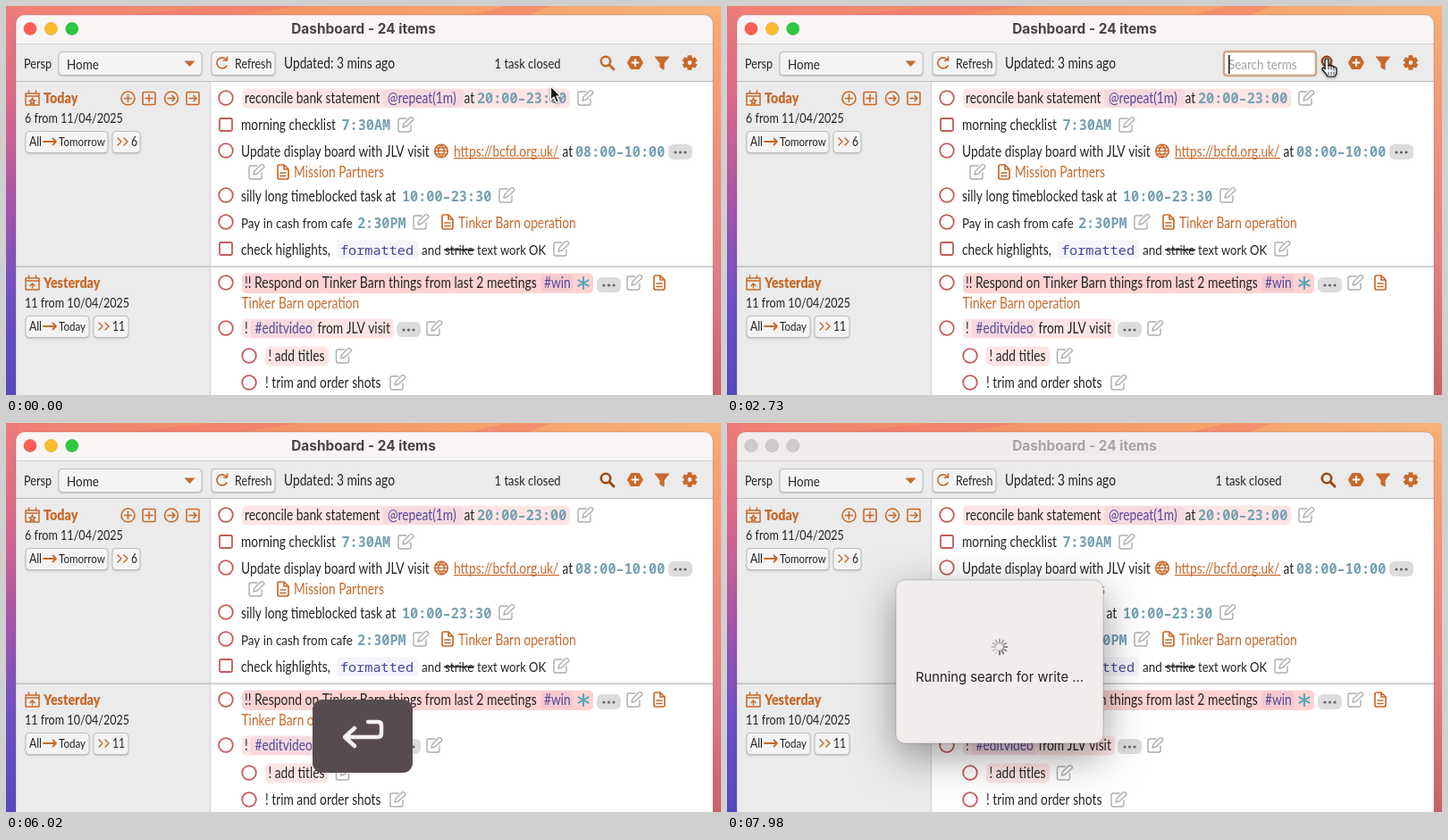
Animation of 800 by 436 pixels, one loop 8 s. Source, as an HTML page with a canvas:

```html
<!DOCTYPE html>
<html lang="en">
<head>
<meta charset="utf-8">
<title>Dashboard search</title>
<style>
  html, body { margin: 0; width: 100%; height: 100%; overflow: hidden; }
  canvas { display: block; width: 800px; height: 436px; }
</style>
</head>
<body>
<canvas id="stage" width="800" height="436"></canvas>
<script>
const ctx = document.getElementById('stage').getContext('2d');
const LOOP = 8000, STEP = 70, TAU = Math.PI * 2;
const INK = '#242424', ORANGE = '#c8692b', RUST = '#9c480f', RED = '#c45b5a',
      GREY = '#adadad', INDIGO = '#53489a', TEAL = '#76a0b1';
const CONDENSED = 0.84;   // one width for the whole condensed face
const GROUP = 'Tinker Barn', CLIENT = 'JLV';

const clamp = v => Math.max(0, Math.min(1, v));
const ease = v => v * v * (3 - 2 * v);
const ramp = (t, from, to) => ease(clamp((t - from) / (to - from)));
const mix = (a, b, k) => a + (b - a) * k;

function text(s, x, y, color = INK, size = 16.4, weight = 400) {
  ctx.save();
  ctx.translate(x, y);
  ctx.scale(CONDENSED, 1);
  ctx.font = `${weight} ${size}px Lato, sans-serif`;
  ctx.fillStyle = color;
  ctx.fillText(s, 0, 0);
  ctx.restore();
}
function mono(s, x, y, color = TEAL, weight = 600) {
  ctx.font = `${weight} 15.2px "Noto Sans Mono", monospace`;
  ctx.fillStyle = color;
  ctx.fillText(s, x, y);
}
function centered(s, x, y, font, color) {
  ctx.font = font;
  ctx.fillStyle = color;
  ctx.textAlign = 'center';
  ctx.fillText(s, x, y);
  ctx.textAlign = 'left';
}
function rect(x, y, w, h, color) {
  ctx.fillStyle = color;
  ctx.fillRect(x, y, w, h);
}
function round(x, y, w, h, r, fill, stroke, line = 1) {
  ctx.beginPath();
  ctx.roundRect(x, y, w, h, r);
  if (fill) { ctx.fillStyle = fill; ctx.fill(); }
  if (stroke) { ctx.strokeStyle = stroke; ctx.lineWidth = line; ctx.stroke(); }
}
function disc(x, y, r, fill, stroke, line = 1) {
  ctx.beginPath();
  ctx.arc(x, y, r, 0, TAU);
  if (fill) { ctx.fillStyle = fill; ctx.fill(); }
  if (stroke) { ctx.strokeStyle = stroke; ctx.lineWidth = line; ctx.stroke(); }
}
// SVG path relative to (x, y)
function path(d, x, y, { stroke, fill, line = 1.6 }) {
  const p = new Path2D(d);
  ctx.save();
  ctx.translate(x, y);
  ctx.lineCap = ctx.lineJoin = 'round';
  if (fill) { ctx.fillStyle = fill; ctx.fill(p); }
  if (stroke) { ctx.strokeStyle = stroke; ctx.lineWidth = line; ctx.stroke(p); }
  ctx.restore();
}
function withShadow(color, blur, dy, draw) {
  ctx.save();
  ctx.shadowColor = color;
  ctx.shadowBlur = blur;
  ctx.shadowOffsetY = dy;
  draw();
  ctx.restore();
}
function gradient(x0, y0, x1, y1, ...colors) {
  const g = ctx.createLinearGradient(x0, y0, x1, y1);
  colors.forEach((c, i) => g.addColorStop(i / (colors.length - 1), c));
  return g;
}

const pencil = (x, y) => path('M1-7H-6Q-8-7-8-5V6Q-8 8-6 8H4Q6 8 6 6V1M-3 3L-2-1L5-8Q6.5-9 8-7.5T8.5-5L1 2Z',
  x, y, { stroke: GREY, line: 1.4 });
const doc = (x, y) => path('M-6-6Q-6-8-4-8H1L6-3V6Q6 8 4 8H-4Q-6 8-6 6ZM1-8V-3H6M-3 1H3M-3 4.5H3',
  x, y, { stroke: ORANGE, line: 1.7 });
const openTask = (x, y) => disc(x, y, 7.8, null, RED, 1.8);
const checkbox = (x, y) => round(x - 7, y - 7, 14, 14, 1.5, null, RED, 1.8);
const chevrons = (x, y) => path('M0-4L4 0L0 4M7-4L11 0L7 4', x, y, { stroke: ORANGE, line: 1.5 });

function morePill(x, y) {
  round(x, y - 8, 27, 17, 6, '#dcdcdc');
  for (let i = -1; i < 2; i++) disc(x + 13.5 + i * 5.5, y + 1, 1.6, '#666');
}
function button(x, y, w, h) {
  withShadow('rgba(0,0,0,.25)', 2, 1, () => round(x, y, w, h, 4, '#f4f4f4'));
  round(x, y, w, h, 4, null, '#bcbcbc');
}

function drawDesktop() {
  rect(0, 0, 800, 436, gradient(0, 0, 800, 0, '#f07d74', '#f28b6c', '#f59b66', '#f6a66c', '#f9b277'));
  path('M230 0H330L250 12H120ZM560 0H610L580 12H510Z', 0, 0, { fill: 'rgba(240,110,110,.4)' });
  rect(0, 0, 14, 436, gradient(0, 0, 0, 436, '#ee7b78', '#da688c', '#a755a8', '#6d51c4', '#5549bd'));
  rect(786, 10, 14, 426, gradient(0, 10, 0, 436, '#f7ad72', '#f0927a', '#e27f80', '#cb6067'));
}

function drawTitleBar(active) {
  rect(11, 10, 780, 33, active ? '#f9f5f4' : '#f0ecec');
  const lights = active ? ['#ff5d56', '#fdbc2e', '#2bc840'] : Array(3).fill('#cfcbcc');
  lights.forEach((c, i) => disc(27 + i * 23.4, 25.5, 7.2, c, 'rgba(0,0,0,.13)', .8));
  centered('Dashboard - 24 items', 400, 31, 'bold 15.4px Inter, sans-serif', active ? '#464345' : '#a5a2a3');
}

function drawToolbar(searchOpen, iconColor) {
  rect(11, 42, 780, 43, '#ebebeb');
  rect(11, 42, 780, 1, '#cfcfcf');
  text('Persp', 20, 70, INK, 15);
  button(59, 51.5, 160, 26);
  text('Home', 68, 70.5, INK, 16);
  path('M-6-3H6L0 3.5Z', 205.5, 64.5, { fill: ORANGE });
  button(230, 51.5, 71, 26);
  path('M5 3A6 6 0 1 1 4.5-4M5.5-7V-3H1.5', 242, 64, { stroke: ORANGE, line: 1.7 });
  text('Refresh', 256, 69.5, INK, 14.8);
  text('Updated: 3 mins ago', 311, 69.5);
  if (!searchOpen) text('1 task closed', 546.5, 69.5, INK, 15.5);

  disc(671, 62, 5.2, null, iconColor, 2.6);
  path('M4 4L9 9', 671, 62, { stroke: iconColor, line: 3 });
  path('M-8.5 0L-4.5-7H4.5L8.5 0L4.5 7H-4.5Z', 704, 63.5, { fill: ORANGE, stroke: ORANGE, line: 1 });
  path('M-3.5 0H3.5M0-3.5V3.5', 704, 63.5, { stroke: '#fff', line: 2 });
  path('M-7.5-6.5H7.5L2 .5V7.5L-2 5V.5Z', 734, 63.5, { fill: ORANGE, stroke: ORANGE, line: 1.2 });
  drawGear(765, 63.5);
}
function drawGear(x, y) {
  ctx.save();
  ctx.translate(x, y);
  for (let i = 0; i < 6; i++) {
    ctx.rotate(TAU / 6);
    rect(-2.4, -8.3, 4.8, 5, ORANGE);
  }
  ctx.restore();
  disc(x, y, 4.4, null, ORANGE, 4);
}

function calendar(x, y, mark) {
  path('M-7.5-5H7.5V8H-7.5ZM-7.5-2H7.5M-4-8V-5M4-8V-5', x, y, { stroke: ORANGE, line: 1.5 });
  path(mark, x, y + 3, { stroke: ORANGE, line: 1.4 });
}
function sectionHead(y, title, mark, summary, target, targetEnd, count) {
  calendar(29.5, y, mark);
  text(title, 42, y + 6, ORANGE, 17, 900);
  text(summary, 21, y + 28, INK, 15);
  button(22, y + 37.5, targetEnd - 22, 24);
  text('All', 26, y + 54, INK, 14.5);
  path('M0 0H14M10.5-3.5L14 0L10.5 3.5', 42, y + 49, { stroke: ORANGE, line: 1.8 });
  text(target, 59, y + 54, INK, 13.8);
  const x = targetEnd + 5;
  button(x, y + 37.5, count.length > 1 ? 39 : 31, 24);
  chevrons(x + 6, y + 49);
  text(count, x + 21, y + 54, INK, 14.5);
}

function drawSidebar() {
  rect(11, 85, 218, 351, '#ebebeb');
  sectionHead(103, 'Today', 'M0-3L1 0H3.5L1.5 1.5L2 4L0 2.5L-2 4L-1.5 1.5L-3.5 0H-1Z',
    '6 from 11/04/2025', 'Tomorrow', 114, '6');
  sectionHead(310, 'Yesterday', 'M0 3V-2M-2.5 .5L0-2L2.5 .5', '11 from 10/04/2025', 'Today', 93, '11');
  const plus = 'M-4 0H4M0-4V4', arrow = 'M-4 0H4M1-3L4 0L1 3';
  [[136.5, plus], [160, plus], [185, arrow], [209, arrow]].forEach(([x, mark], i) => {
    if (i % 2) round(x - 7, 96.5, 14, 14, 1.5, null, ORANGE, 1.6);
    else disc(x, 103.5, 7.5, null, ORANGE, 1.6);
    path(mark, x, 103.5, { stroke: ORANGE, line: 1.6 });
  });
}

function drawToday() {
  openTask(246, 103);
  round(264, 92.5, 367, 22, 5, '#fee5e5');
  round(422, 93.5, 90, 20, 4, '#f5d9de');
  text('reconcile bank statement', 267, 109);
  text('@repeat(1m)', 427, 109, INDIGO);
  text('at', 512.5, 109);
  mono('20:00–23:00', 527, 109);
  pencil(648, 103);

  checkbox(246, 133);
  text('morning checklist', 263, 139);
  mono('7:30AM', 375.5, 139);
  pencil(447, 133);

  openTask(246, 162);
  text(`Update display board with ${CLIENT} visit`, 263, 168.5);
  disc(487, 162.5, 7.3, null, ORANGE, 1.6);
  path('M-7 0H7M-6-3.5H6M-6 3.5H6M0-7Q-7 0 0 7Q7 0 0-7', 487, 162.5, { stroke: ORANGE, line: 1.3 });
  text('https://bcfd.org.uk/', 501, 168.5, ORANGE);
  rect(501, 170, 118, 1.2, ORANGE);
  text('at', 622.5, 168.5);
  mono('08:00–10:00', 637, 168.5);
  morePill(741, 163);
  pencil(280, 186);
  doc(310, 186);
  text('Mission Partners', 322, 192, ORANGE);

  openTask(246, 212);
  text('silly long timeblocked task at', 263, 218.5);
  mono('10:00–23:30', 443, 218.5);
  pencil(560, 212);

  openTask(246, 242);
  text('Pay in cash from cafe', 263, 248.5, INK, 16);
  mono('2:30PM', 393, 248.5);
  pencil(464, 242);
  doc(494, 242);
  text(`${GROUP} operation`, 506, 248.5, ORANGE);

  checkbox(246, 272);
  text('check highlights,', 263, 278.5);
  round(370, 262.5, 91, 21, 4, '#f4f4fa');
  mono('formatted', 374, 278.5, '#3f4997', 500);
  text('and', 465, 278.5, INK, 16);
  text('strike', 491, 278.5, INK, 16);
  rect(490, 272.5, 34, 1.5, INK);
  text('text work OK', 527, 278.5, INK, 15.5);
  pencil(621, 272);
}

function drawYesterday() {
  openTask(246, 310);
  round(264, 299.5, 393, 22.5, 5, '#fdd3d3');
  round(599, 300.5, 35, 20, 4, '#f3c9d0');
  text(`!! Respond on ${GROUP} things from last 2 meetings`, 267, 316, INK, 16.6);
  text('#win', 602, 316, INDIGO);
  path('M0-6.5V6.5M-5.6-3.2L5.6 3.2M-5.6 3.2L5.6-3.2', 646, 310.5, { stroke: '#5aa5b5', line: 2 });
  morePill(661, 312);
  pencil(703, 310);
  doc(731, 310);
  text(`${GROUP} operation`, 263.5, 339, ORANGE);

  openTask(246, 361);
  round(264, 350.5, 170, 22, 5, '#fee5e5');
  round(274, 351.5, 71, 20, 4, '#f5d9de');
  text('!', 267, 367);
  text('#editvideo', 278.5, 367, INDIGO);
  text(`from ${CLIENT} visit`, 348.5, 367);
  morePill(437, 362);
  pencil(479, 361);

  openTask(272, 392);
  round(290, 381.5, 71, 22, 5, '#fee5e5');
  text('! add titles', 293.5, 398);
  pencil(377.5, 392);

  openTask(272, 422);
  text('! trim and order shots', 290, 428);
  pencil(438, 422);
}

function drawSearchField(t, openness) {
  if (openness <= 0) return;
  const right = 659, w = 115 * openness, x = right - w;
  round(x, 51, w, 27, 3, '#fff', '#dfc2b2', 3);
  round(x, 51, w, 27, 3, null, '#b98a70', 1);
  ctx.save();
  ctx.beginPath();
  ctx.rect(x, 51, w, 27);
  ctx.clip();
  const typed = 'write'.slice(0, [4410, 4760, 4970, 5110, 5250].filter(at => t >= at).length);
  if (typed) {
    text(typed, x + 5, 71, '#111', 15.5);
    disc(641.5, 66, 6, '#6d6d6d');
    path('M-2-2L2 2M-2 2L2-2', 641.5, 66, { stroke: '#fff', line: 1.5 });
  } else {
    text('Search terms', x + 5, 71, '#a3a3a3', 16);
  }
  ctx.font = '400 15.5px Lato, sans-serif';
  const caretX = x + 5 + ctx.measureText(typed).width * CONDENSED;
  ctx.globalAlpha = typed ? 1 : 1 - ramp(t, 3290, 3500) + ramp(t, 3640, 3990);
  rect(caretX, 55, 1.6, 21, '#222');
  ctx.restore();
}

function drawPointer(t) {
  if (t >= 4410) return;
  const k = ramp(t, 210, 910);
  const x = mix(609.5, 671, k), y = mix(90, 60, k);
  const hand = t >= 770;
  const shape = hand
    ? 'M-2 1Q-2-1 0-1T2 1V7Q4 5.5 5 7.5Q7 6.3 8 8.5Q11 8 11 11V14Q11 17 9 19H1Q-1 15-4.5 12Q-6 9-3.5 9L-2 10.5Z'
    : 'M0 0V15.5L3.6 12L6.2 18L9 16.8L6.4 11H11Z';
  withShadow('rgba(0,0,0,.35)', 3, 1, () => path(shape, x, y,
    { fill: hand ? '#fff' : '#111', stroke: hand ? '#111' : '#fff', line: 1.2 }));
  if (hand) path('M2 7V11M5 8V11.5M8 9V12M2 14V17M5 14V17M8 14V17', x, y, { stroke: '#222', line: .9 });
}

function drawClickRing(t) {
  if (t < 2100 || t > 2590) return;
  ctx.globalAlpha = ramp(t, 2030, 2240) * (1 - ramp(t, 2310, 2590)) * .85;
  disc(672, 62, mix(9, 19, ramp(t, 2100, 2310)), null, '#d7def0', 3.5);
  ctx.globalAlpha = 1;
}

function drawDialog(t) {
  withShadow('rgba(0,0,0,.4)', 46, 14, () => round(189, 176, 232, 183, 10, '#f1edec'));
  round(189, 176, 232, 183, 10, '#f1edec', 'rgba(0,0,0,.22)', .8);
  const head = Math.floor(t / STEP);
  for (let i = 0; i < 12; i++) {
    const a = i / 12 * TAU, age = (head - i + 1200) % 12;
    ctx.globalAlpha = mix(.75, .18, age / 11);
    path(`M${Math.sin(a) * 4.5} ${-Math.cos(a) * 4.5}L${Math.sin(a) * 8.5} ${-Math.cos(a) * 8.5}`,
      305, 251, { stroke: '#444', line: 1.8 });
  }
  ctx.globalAlpha = 1;
  centered('Running search for write ...', 305, 290, '14.8px Inter, sans-serif', '#222');
}

function drawReturnKey(t) {
  const alpha = ramp(t, 5600, 5810) * (1 - ramp(t, 6930, 7280));
  if (alpha <= 0) return;
  ctx.globalAlpha = alpha;
  round(343, 310, 112, 82, 11, '#574b4f');
  path('M6-15H17Q21-15 21-11V-2Q21 2 17 2H-19M-9-8L-20 2L-9 12', 399, 350, { stroke: '#f3f0f1', line: 4.5 });
  ctx.globalAlpha = 1;
}

function draw(t) {
  const searching = t >= 6160;
  const openness = t < 5880 ? ramp(t, 2450, 2800) : 0;
  drawDesktop();
  ctx.save();
  ctx.beginPath();
  ctx.roundRect(11, 10, 780, 460, 10);
  ctx.clip();
  rect(11, 10, 780, 426, '#fff');
  drawTitleBar(!searching);
  drawToolbar(openness > 0, t >= 770 ? RUST : ORANGE);
  drawSidebar();
  drawToday();
  drawYesterday();
  rect(11, 84, 780, 1, '#bdbdbd');
  rect(11, 291.5, 780, 1.2, '#b5b5b5');
  rect(228, 85, 1, 351, '#d2d2d2');
  drawSearchField(t, openness);
  ctx.restore();
  round(11, 10, 780, 460, 10, null, 'rgba(90,40,40,.28)', .8);
  drawClickRing(t);
  drawPointer(t);
  if (searching) drawDialog(t);
  drawReturnKey(t);
}

const start = performance.now();
function tick() {
  const t = (performance.now() - start) % LOOP;
  draw(Math.floor(t / STEP) * STEP);
  requestAnimationFrame(tick);
}
tick();
</script>
</body>
</html>
```
